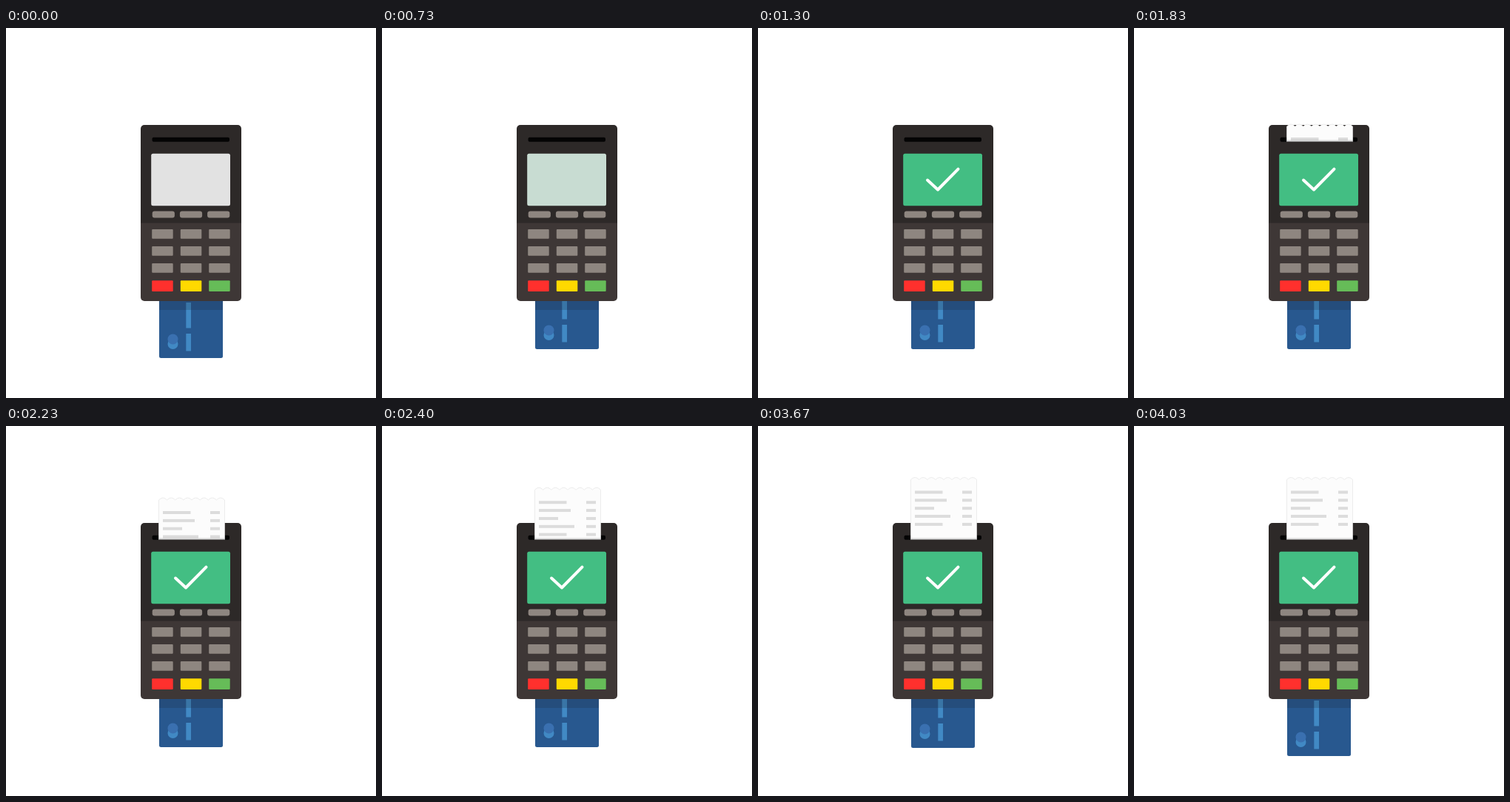
An HTML page that plays this animation: 500 px wide and 500 px high, repeating every 5010 ms.

```html
<!DOCTYPE html>
<html lang="en">
<head>
<meta charset="utf-8">
<title>Card payment</title>
<style>
html, body { margin: 0; width: 100%; height: 100%; overflow: hidden; background: #fff; }
svg { display: block; width: 100vw; height: 100vh; }
</style>
</head>
<body>
<svg viewBox="0 0 500 500">
  <defs>
    <clipPath id="feed"><rect x="200" y="0" width="100" height="153.6"/></clipPath>
    <clipPath id="body"><rect x="182" y="131" width="136" height="238" rx="5"/></clipPath>
  </defs>
  <g id="card">
    <rect x="207" y="340" width="86" height="106" rx="2.5" fill="#28588f"/>
    <path d="M243.3 371h6.7v34.5h-6.7zM243.3 413h6.7v23.5h-6.7z" fill="#4189c4"/>
    <circle cx="225.5" cy="427" r="7" fill="#4189c4"/>
    <circle cx="225.5" cy="420.5" r="7" fill="#3a70b0"/>
  </g>
  <rect x="207" y="369" width="86" height="12" fill="#1d2530" opacity=".2"/>
  <g clip-path="url(#body)">
    <rect x="182" y="131" width="136" height="133" fill="#2d2928"/>
    <rect x="182" y="263.5" width="136" height="106" fill="#3e3736"/>
  </g>
  <rect x="197.5" y="147.8" width="104.5" height="6" rx="2" fill="#040404"/>
  <rect id="screen" x="196.2" y="169.7" width="106.8" height="70.5" rx="2.5"/>
  <g id="keys"></g>
  <path id="check" d="M229 205.5L243 218.5L270.5 190.7" fill="none" stroke="#fff"
    stroke-width="4" stroke-linecap="round" stroke-linejoin="round"/>
  <g clip-path="url(#feed)">
    <g id="receipt"></g>
    <rect id="lip" x="206.5" y="151.3" width="89" height="2.3" fill="#000" opacity=".13"/>
  </g>
</svg>
<script>
const LOOP = 5010, FRAME = 100 / 3;
const $ = id => document.getElementById(id);
const ramp = (f, a, b) => Math.min(1, Math.max(0, (f - a) / (b - a)));
const rect = (x, y, w, h, r, fill) =>
  `<rect x="${x}" y="${y}" width="${w}" height="${h}" rx="${r}" fill="${fill}"/>`;

function buildKeys() {
  const cols = [197.2, 235.8, 274.2];
  const accents = ['#ff302d', '#ffd900', '#66bc58'];
  let out = '';
  cols.forEach((x, i) => {
    out += rect(197.7 + 37.2 * i, 247.5, 30.2, 9, 3, '#8e8680');
    for (let row = 0; row < 3; row++) out += rect(x, 272 + 23 * row, 28.5, 12.8, 1, '#8e8680');
    out += rect(x, 341.2, 28.5, 14.8, 1, accents[i]);
  });
  $('keys').innerHTML = out;
}

function buildReceipt() {
  const bump = 89 / 8;
  let edge = 'M206.5 260V72.5';
  for (let i = 0; i < 8; i++) edge += `q${bump / 2} -6 ${bump} 0`;
  let out = `<path d="${edge}V260z" fill="#fcfcfc" stroke="#e4e4e4" stroke-width=".7"/>`;
  [37.5, 43, 26, 48, 37.5].forEach((w, i) => {
    const y = 87.5 + 10.85 * i;
    out += rect(212, y, w, 4, 0, '#dcdcdc') + rect(276, y, 13, 4, 0, '#dcdcdc');
  });
  $('receipt').innerHTML = out;
}

function screenColor(f) {
  const k = f < 22 ? 0 : ramp(f, 19, 37);
  const mix = (a, b) => Math.round(a + (b - a) * k);
  return `rgb(${mix(226, 67)},${mix(226, 190)},${mix(226, 131)})`;
}

function draw(ms) {
  const f = Math.floor((ms % LOOP + 4) / FRAME);

  const inserted = 12 * (ramp(f, 0, 11) - ramp(f, 109, 121));
  $('card').setAttribute('transform', `translate(0 ${-inserted})`);

  $('screen').setAttribute('fill', screenColor(f));

  // The tick pops in slightly large, then settles.
  const size = f < 39 ? 1.12 : 1;
  $('check').setAttribute('visibility', f < 38 ? 'hidden' : 'visible');
  $('check').setAttribute('transform',
    `translate(249.7 204.6) scale(${size}) translate(-249.7 -204.6)`);

  // The paper feeds out in two equal pulls.
  const drop = 88 - 44 * (ramp(f, 45, 61) + ramp(f, 61, 77));
  $('receipt').setAttribute('transform', `translate(0 ${drop})`);
  $('lip').setAttribute('visibility', f < 46 ? 'hidden' : 'visible');
}

buildKeys();
buildReceipt();
draw(0);
const start = performance.now();
function tick() {
  draw(performance.now() - start);
  requestAnimationFrame(tick);
}
requestAnimationFrame(tick);
</script>
</body>
</html>
```
